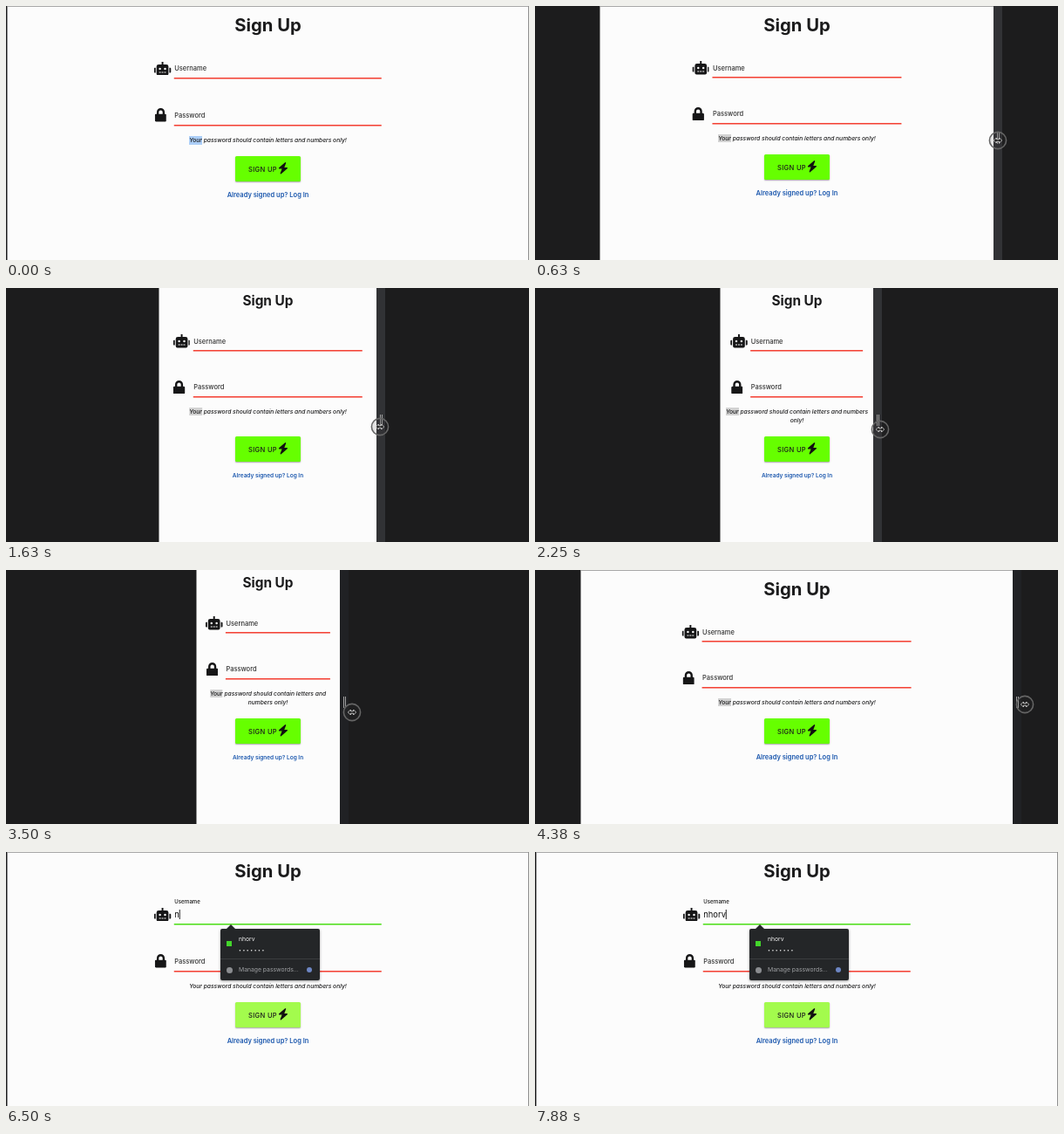
An HTML page that plays this animation: 600 px wide and 291 px high, repeating every 8000 ms.

```html
<!DOCTYPE html>
<html lang="en">
<head>
<meta charset="utf-8">
<title>Sign Up</title>
<style>
  html, body { margin: 0; width: 100%; height: 100%; overflow: hidden; background: #1c1c1d; }
  #stage {
    position: relative; width: 600px; height: 291px; overflow: hidden;
    font-family: Inter, Roboto, sans-serif; color: #1b1b1c; white-space: nowrap;
  }
  #stage * { position: absolute; box-sizing: border-box; }
  #page { top: 0; height: 291px; background: #fcfcfc; overflow: hidden; box-shadow: 0 0 0 1px #8f8f8f; }
  #topline { left: 0; right: 0; top: 0; height: 1px; background: #a9a9a9; }

  /* Text boxes are centred on their top value */
  .t { line-height: 20px; height: 20px; margin-top: -10px; }
  .mid { left: 0; right: 0; text-align: center; }
  #title { font-weight: 700; }
  #form { left: 50%; transform: translateX(-50%); height: 291px; top: 0; }
  .field { left: 0; right: 0; height: 0; }
  .field svg { left: 0; top: -7.9px; height: 15.4px; fill: #161617; }
  #user svg { left: -.6px; }
  .label { left: 23px; top: .7px; font-size: 7.5px; font-weight: 500; color: #333; }
  .line { left: 22.8px; right: 0; top: 10.4px; height: 1px; color: #f44336;
    background: currentColor; box-shadow: 0 1px color-mix(in srgb, currentColor 55%, transparent); }
  #typed { left: 23px; top: .5px; font-size: 9.4px; color: #111; }
  #stage #typed span, #stage #hint span { position: static; }
  #caret { display: inline-block; width: .8px; height: 11px; background: #222; vertical-align: -2.2px; }
  #hint {
    left: 50%; transform: translateX(-50%); margin-top: -5.2px; line-height: 10.3px;
    font-size: 6.7px; font-weight: 500; font-style: italic; text-align: center; white-space: normal;
  }
  #stage #hint #sel { padding: .8px 0; }
  #button {
    left: 50%; width: 75px; height: 29px; margin-left: -37.5px; border-radius: 1.5px;
    box-shadow: 0 1px 1.5px rgba(0, 0, 0, .35);
  }
  #button .t { left: 15px; top: 16px; font-size: 7.6px; font-weight: 500; letter-spacing: .3px; }
  #button svg { left: 49px; top: 7.3px; width: 11.9px; height: 13.6px; }
  #link { font-weight: 600; color: #1c58ae; }

  #bar { top: 0; width: 10px; height: 291px; }
  #grip { left: 4px; top: 145px; width: 3px; height: 13px; border: solid #a0a0a0; border-width: 0 1px; }
  #cursor { width: 22px; height: 22px; margin: -11px 0 0 -11px; }

  #popup { left: 246px; top: 88px; width: 114px; height: 59px; border-radius: 2px; background: #242628;
    box-shadow: 0 1px 3px rgba(0, 0, 0, .4); font-size: 6.8px; color: #f2f2f2; }
  #popup::before { content: ""; position: absolute; left: 6.5px; top: -5px;
    border: solid transparent; border-width: 0 5px 5px; border-bottom-color: #242628; }
  #popup .t { left: 21px; }
  #rule { left: 0; right: 0; top: 34px; height: 1px; background: #3a3c3f; }
  .dot { border-radius: 50%; }
</style>
</head>
<body>
<div id="stage">
  <div id="page">
    <div id="topline"></div>
    <div id="title" class="t mid">Sign Up</div>
    <div id="form">
      <div id="user" class="field">
        <svg viewBox="0 0 640 512" width="19.6" preserveAspectRatio="none"><path fill-rule="evenodd" d="M288 0h64v96h112a80 80 0 0 1 80 80v272a64 64 0 0 1-64 64H160a64 64 0 0 1-64-64V176a80 80 0 0 1 80-80h112zM184 264a40 40 0 1 0 80 0a40 40 0 1 0-80 0M376 264a40 40 0 1 0 80 0a40 40 0 1 0-80 0M192 384v32h64v-32zM288 384v32h64v-32zM384 384v32h64v-32zM32 224h32v192H32a32 32 0 0 1-32-32V256a32 32 0 0 1 32-32M576 224h32a32 32 0 0 1 32 32v128a32 32 0 0 1-32 32h-32z"/></svg>
        <div id="userLabel" class="t label">Username</div>
        <div id="typed" class="t"><span id="name"></span><span id="caret"></span></div>
        <div id="userLine" class="line"></div>
      </div>
      <div id="pass" class="field">
        <svg viewBox="0 0 448 512" width="13.5"><path fill-rule="evenodd" d="M48 224h24v-72a152 152 0 0 1 304 0v72h24a48 48 0 0 1 48 48v192a48 48 0 0 1-48 48H48a48 48 0 0 1-48-48V272a48 48 0 0 1 48-48M152 224h144v-72a72 72 0 0 0-144 0z"/></svg>
        <div class="t label">Password</div>
        <div class="line"></div>
      </div>
    </div>
    <div id="hint"><span id="sel">Your</span> password should contain letters and numbers only!</div>
    <div id="button">
      <div class="t">SIGN UP</div>
      <svg viewBox="0 0 448 512"><path d="M322 30L60 258H212L124 482L388 254H236Z" fill="#111" stroke="#111" stroke-width="52" stroke-linejoin="round"/></svg>
    </div>
    <div id="link" class="t mid">Already signed up? Log In</div>
  </div>

  <div id="bar"><div id="grip"></div></div>
  <svg id="cursor" viewBox="-11 -11 22 22">
    <circle r="9.6" fill="rgba(60,60,60,.12)" stroke="#656565" stroke-width="1.6"/>
    <path d="M-4.6 0L-1.6-3V-1.2H1.6V-3L4.6 0L1.6 3V1.2H-1.6V3Z" fill="#161616" stroke="#e8e8e8" stroke-width=".8"/>
  </svg>

  <div id="popup">
    <div style="left:7px;top:14px;width:6px;height:6px;background:#43d52b"></div>
    <div id="account" class="t" style="top:12px"></div>
    <div class="t" style="top:24px;font-size:5px;letter-spacing:1.6px">•••••••</div>
    <div id="rule"></div>
    <div class="dot" style="left:7px;top:43.5px;width:7px;height:7px;background:#8b8d90"></div>
    <div class="t" style="top:47px;color:#a0a2a5">Manage passwords...</div>
    <div class="dot" style="left:99px;top:44px;width:6px;height:6px;background:#6d86c4"></div>
  </div>
</div>
<script>
const LOOP = 8000, STEP = 125, CENTER = 300.5, NAME = "nhorv";
const OPEN = 375, CLOSE = 4875, FOCUS = 5625, POPUP = 6250, TYPE = 6500;

// [time, value] points
const HALF = [[500, 247.5], [875, 180.5], [1000, 161.5], [1750, 117.5], [2250, 87.5], [2625, 82],
  [3500, 82], [3875, 138], [4125, 207], [4375, 247.5]];
const CURSOR_X = [[500, 556], [875, 481], [1000, 466.8], [1750, 422], [2250, 396], [3500, 396.5],
  [3875, 451], [4125, 521], [4375, 562]];
const CURSOR_Y = [[500, 154], [1000, 155.5], [2250, 162], [3500, 163], [4375, 154]];

const el = {};
document.querySelectorAll("[id]").forEach(node => el[node.id] = node);
el.account.textContent = NAME;

const px = n => n + "px";
const clamp = n => Math.max(0, Math.min(1, n));
const mix = (a, b, k) => a + (b - a) * k;
const show = (node, on) => node.style.display = on ? "" : "none";

function along(points, t) {
  let i = 1;
  while (i < points.length - 1 && t > points[i][0]) i++;
  const [t0, a] = points[i - 1], [t1, b] = points[i];
  return mix(a, b, clamp((t - t0) / (t1 - t0)));
}

function layout(full, w) {
  const small = w < 262, mid = !small && w < 436;
  const up = small ? 10 : 0;
  const wrap = small || mid ? 10.3 : 0;
  const formW = full ? 260.5 : w * (small ? .867 : mid ? .508 : .531);
  const hintW = small ? w * .96 : mid ? w * .53 : 240;
  const shift = full ? 2.3 : 0;

  el.title.style.top = px(small ? 15.3 : 22.3);
  el.title.style.fontSize = px(small ? 15.4 : 20.3);
  el.form.style.width = px(formW);
  el.user.style.top = px((full ? 71.6 : 71) - up);
  el.pass.style.top = px((full ? 125.2 : 123.4) - up);
  el.hint.style.width = px(hintW);
  el.hint.style.top = px(151.7 + shift - up);
  el.button.style.top = px(169.8 + shift + wrap - up);
  el.link.style.top = px(214.5 + shift * 1.2 + wrap - up);
  el.link.style.fontSize = px(small ? 6.5 : 7.5);
  show(el.topline, !small);
}

function render(now) {
  const t = Math.floor(now % LOOP / STEP) * STEP;
  const full = t < OPEN || t >= CLOSE;
  const half = full ? 298.5 : along(HALF, t);
  const w = half * 2;
  el.page.style.left = px(CENTER - half);
  el.page.style.width = px(w);
  layout(full, w);

  show(el.bar, !full);
  show(el.cursor, !full);
  el.bar.style.left = px(CENTER + half);
  const dragging = t < 2700 || (t > 3500 && t < 4375);
  el.bar.style.background = dragging ? "#313235" : "#202124";
  el.cursor.style.left = px(along(CURSOR_X, t));
  el.cursor.style.top = px(along(CURSOR_Y, t));

  const focused = t >= FOCUS;
  const lift = clamp((t - FOCUS) / 250);
  el.sel.style.background = focused ? "none" : t < OPEN ? "#accef7" : "#d2d2d2";
  el.userLabel.style.top = px(mix(.7, -14.6, lift));
  el.userLabel.style.fontSize = px(mix(7.5, 6, lift));
  el.userLabel.style.color = focused ? "#111" : "#333";
  el.userLine.style.color = focused ? "#4fdf1a" : "#f44336";
  show(el.typed, focused);
  el.name.textContent = NAME.slice(0, Math.max(0, Math.floor((t - TYPE) / 250) + 1));
  show(el.popup, t >= POPUP);
  el.button.style.background = t >= POPUP ? "#a3fb4d" : "#66ff00";
}

function tick() {
  render(performance.now());
  requestAnimationFrame(tick);
}
tick();
</script>
</body>
</html>
```
